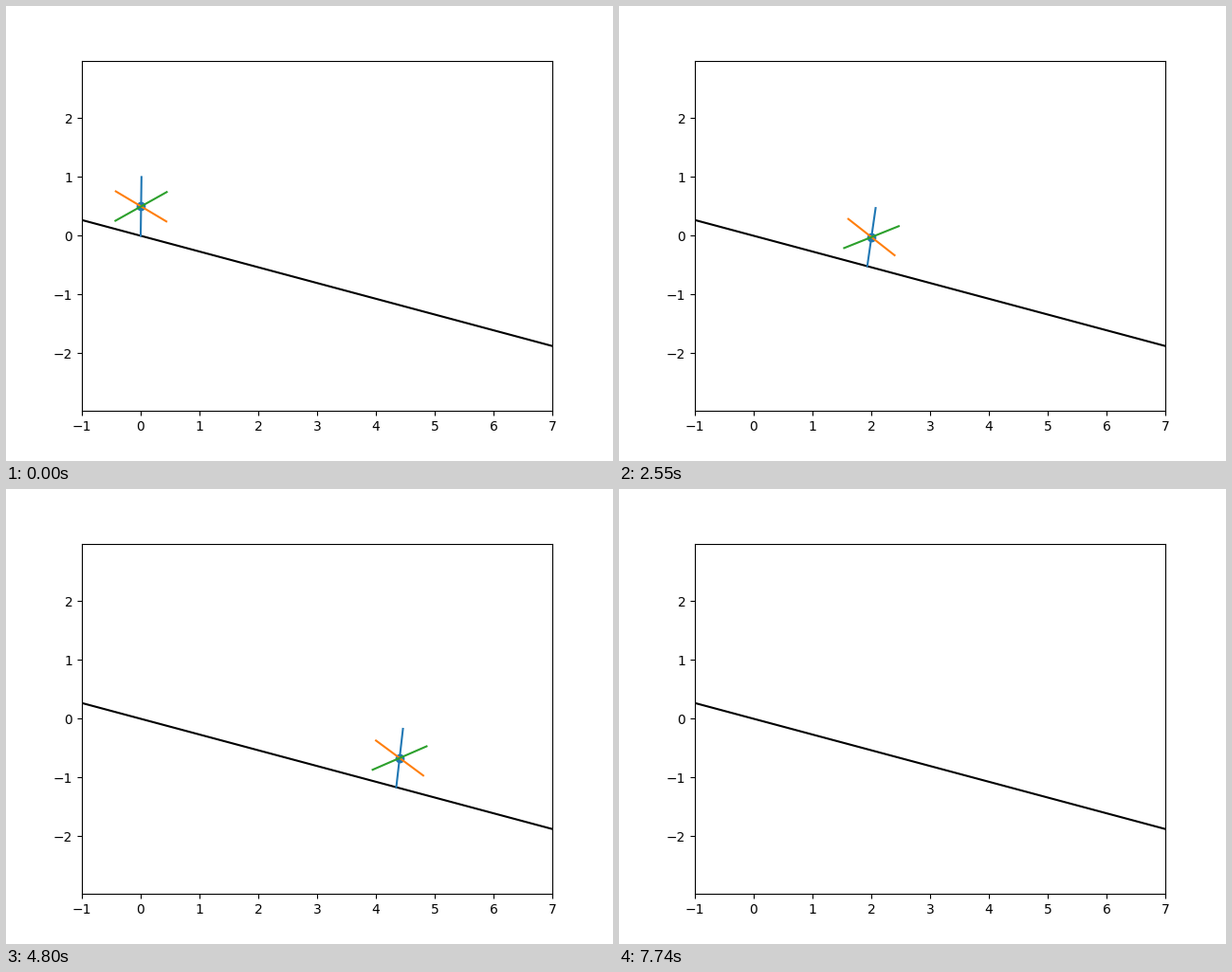
A matplotlib script that plays this animation: 640 px wide and 480 px high, repeating every 7.8 s.

```python
import numpy as np
import matplotlib.pyplot as plt
from matplotlib.animation import FuncAnimation

FRAMES, INTERVAL = 260, 30
LEG = 0.5
SLOPE = np.radians(15)
HALF = np.radians(30)       # half the angle between spokes
RATE = 9.847                # gravity over effective leg length
DT, SUBSTEPS = 0.05, 40
START = (0.01356, 0.0)      # lean of the stance leg, angular speed


def advance(state, h):
    """One RK4 step of the inverted pendulum."""
    def f(s):
        return np.array([s[1], RATE * np.sin(s[0])])

    k1 = f(state)
    k2 = f(state + h / 2 * k1)
    k3 = f(state + h / 2 * k2)
    k4 = f(state + h * k3)
    return state + h / 6 * (k1 + 2 * k2 + 2 * k3 + k4)


def simulate():
    """Stance count and lean for every frame."""
    h = DT / SUBSTEPS
    strike = SLOPE + HALF
    state, count, poses = np.array(START), 0, []
    for _ in range(FRAMES):
        poses.append((count, state[0]))
        for _ in range(SUBSTEPS):
            new = advance(state, h)
            if new[0] >= strike:
                part = h * (strike - state[0]) / (new[0] - state[0])
                speed = advance(state, part)[1]
                landed = np.array([SLOPE - HALF, speed * np.cos(2 * HALF)])
                new = advance(landed, h - part)
                count += 1
            state = new
    return poses


poses = simulate()
stride = 2 * LEG * np.sin(HALF) * np.array([np.cos(SLOPE), -np.sin(SLOPE)])

fig, ax = plt.subplots(figsize=(6.4, 4.8), dpi=100)
ground = np.array([-1, 7])
ax.plot(ground, -np.tan(SLOPE) * ground, "k")
hub_dot = ax.scatter([0], [LEG], color="C0")
spokes = [ax.plot([], [], color=c)[0] for c in ("C0", "C1", "C2")]
half_height = 4 * 369.6 / 496   # equal scale on both axes
ax.set_xlim(-1, 7)
ax.set_ylim(-half_height, half_height)


def direction(angle):
    return LEG * np.array([np.sin(angle), np.cos(angle)])


def update(i):
    count, lean = poses[i]
    hub = count * stride + direction(lean)
    hub_dot.set_offsets([hub])
    for spoke, turn in zip(spokes, (0, -2 * HALF, 2 * HALF)):
        arm = direction(lean + turn)
        spoke.set_data(*np.transpose([hub - arm, hub + arm]))
    return [hub_dot, *spokes]


anim = FuncAnimation(fig, update, frames=FRAMES, interval=INTERVAL,
                     repeat=True, repeat_delay=0)
plt.show()
```
